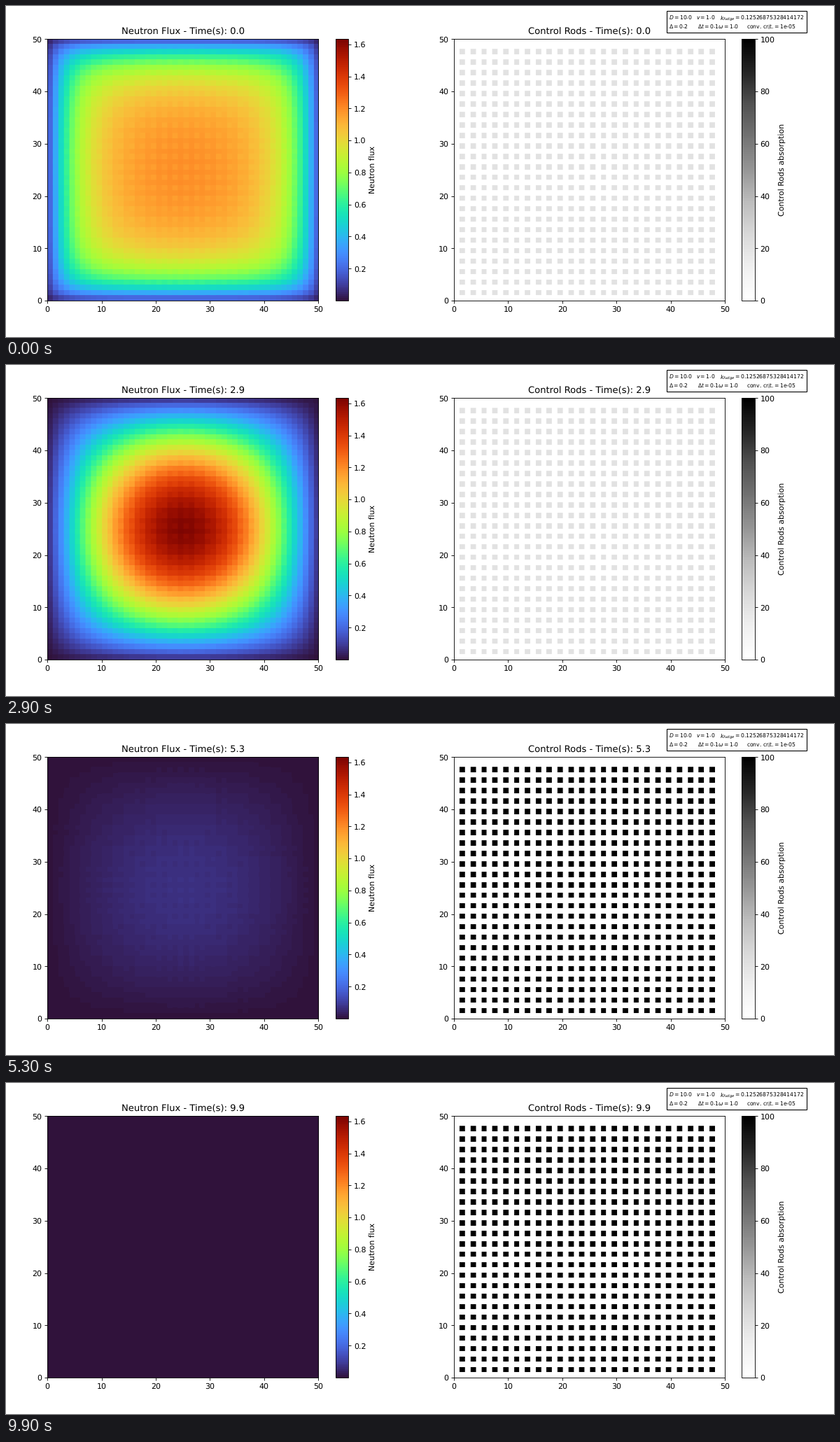
Recreate the animation shown at these times as a matplotlib script. Size 1183 by 473 pixels, loop 10 s.

```python
import numpy as np
import matplotlib.pyplot as plt
from matplotlib.animation import FuncAnimation
from matplotlib.patches import Rectangle

plt.rcParams["text.hinting"] = "no_hinting"

W, H = 1183, 473
DPI = W / 15
N, STEPS, SHUTDOWN = 50, 100, 51
FINE_ROWS, FINE_COLS = 474, 491    # fine grid, softened when scaled to the axes
D, DELTA, DT = 10.0, 0.2, 0.1
ROD_LOW, ROD_HIGH = 20.0, 100.0
DRIFT = -0.001          # slow loss per second once the flux has settled
FLUX_MAX = 1.633


def rod_map(level):
    rods = np.zeros((N, N))
    rods[1:48:2, 1:48:2] = level
    return rods


def loss(phi, rods):
    """Leakage plus absorption, with zero flux outside the square."""
    p = np.pad(phi, 1)
    lap = p[2:, 1:-1] + p[:-2, 1:-1] + p[1:-1, 2:] + p[1:-1, :-2] - 4 * phi
    return rods * phi - D / DELTA**2 * lap


def solve(op, b):
    """Conjugate gradients for op(x) = b."""
    x = b.copy()
    r = b - op(x)
    p = r.copy()
    rr = np.sum(r * r)
    goal = 1e-18 * np.sum(b * b)
    for _ in range(400):
        if rr <= goal:
            break
        q = op(p)
        a = rr / np.sum(p * q)
        x += a * p
        r -= a * q
        new = np.sum(r * r)
        p = r + new / rr * p
        rr = new
    return x


def critical_source(rods):
    """Production rate that balances the losses of the lowest mode."""
    s = np.sin(np.pi * np.arange(1, N + 1) / (N + 1))
    phi = np.outer(s, s)
    for _ in range(8):
        phi = solve(lambda u: loss(u, rods), phi)
        phi /= np.sqrt(np.sum(phi * phi))
    return np.sum(phi * loss(phi, rods))


def simulate(low, high):
    source = critical_source(low) + DRIFT
    phi, out = np.ones((N, N)), []
    for i in range(STEPS):
        rods = low if i < SHUTDOWN else high
        phi = solve(lambda u: u + DT * (loss(u, rods) - source * u), phi)
        out.append(phi)
    return out


def fine(field):
    """Repeat the cells on the fine grid."""
    rows = np.arange(FINE_ROWS) * N // FINE_ROWS
    cols = np.arange(FINE_COLS) * N // FINE_COLS
    return field[np.ix_(rows, cols)]


def show_cells(ax, field, cmap, top):
    return ax.imshow(fine(field), cmap=cmap, vmin=0, vmax=top, aspect="auto",
                     origin="lower", extent=(0, N, 0, N),
                     interpolation="hanning")


rods_low, rods_high = rod_map(ROD_LOW), rod_map(ROD_HIGH)
flux = simulate(rods_low, rods_high)

fig, (ax_flux, ax_rods) = plt.subplots(
    1, 2, figsize=((W + 1e-6) / DPI, (H + 1e-6) / DPI), dpi=DPI)
fig.subplots_adjust(left=0.05, right=0.95, bottom=0.11, top=0.9, wspace=0.2)

flux_image = show_cells(ax_flux, flux[0], "turbo", FLUX_MAX)
rods_image = show_cells(ax_rods, rods_low, "Greys", 100)
fig.colorbar(flux_image, ax=ax_flux, label="Neutron flux",
             ticks=np.arange(0.2, 1.7, 0.2))
fig.colorbar(rods_image, ax=ax_rods, label="Control Rods absorption")
flux_title = ax_flux.set_title("")
rods_title = ax_rods.set_title("")


def note(x, y, text, ha="left"):
    fig.text(x / W, 1 - y / H, text, fontsize=7, ha=ha, va="baseline",
             zorder=6)


fig.add_artist(Rectangle((943.5 / W, 1 - 38 / H), 200.5 / W, 30.5 / H,
                         transform=fig.transFigure, facecolor="white",
                         edgecolor="black", linewidth=1, zorder=5))
note(947, 20, "$D = 10.0$")
note(986, 20, "$v = 1.0$")
note(1140, 20, r"$k_{fudge} = 0.12526875328414172$", "right")
note(947, 33, r"$\Delta = 0.2$")
note(988, 33, r"$\Delta t = 0.1\omega = 1.0$")
note(1058, 33, "conv. crit.$ = $1e-05")


def update(i):
    flux_image.set_data(fine(flux[i]))
    rods_image.set_data(fine(rods_low if i < SHUTDOWN else rods_high))
    flux_title.set_text(f"Neutron Flux - Time(s): {i * DT:.1f}")
    rods_title.set_text(f"Control Rods - Time(s): {i * DT:.1f}")
    return flux_image, rods_image, flux_title, rods_title


anim = FuncAnimation(fig, update, frames=STEPS, interval=100, repeat=True,
                     repeat_delay=0, blit=False)
plt.show()
```
